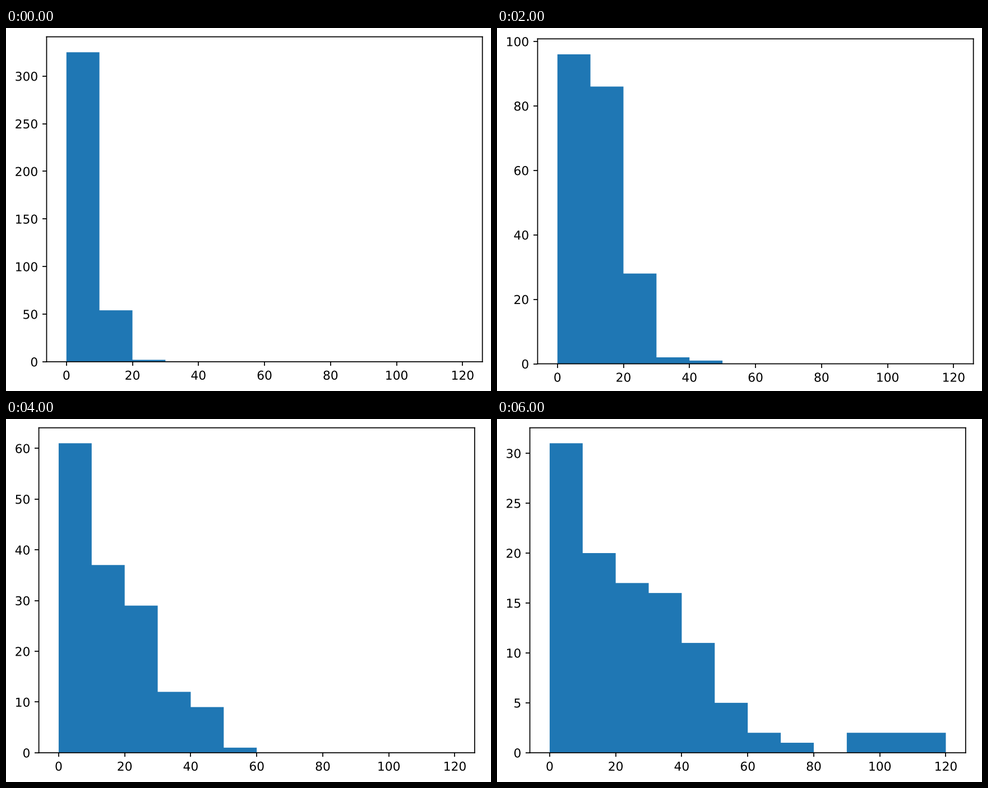
A matplotlib script that plays this animation: 865 px wide and 647 px high, repeating every 8000 ms.

```python
import matplotlib.pyplot as plt
import numpy as np
from matplotlib import patheffects
from matplotlib.animation import FuncAnimation

W, H, DPI = 865, 647, 128
PX = 156.7                        # pixels per inch of the chart itself
SCALE = PX / DPI                  # enlarges the default text and line sizes
AX_W, AX_H = 4.96 * PX, 3.696 * PX
PAD = 0.1 * PX
DIGIT = 0.636 * 10 * PX / 72      # advance of one digit at 10 pt
LABEL_HALF = 0.38 * 10 * PX / 72  # tick position to label top
TICK_GAP = 7 * PX / 72            # tick length plus label padding
BIN, BINS = 10, 12
STEP, LENGTH = 500, 8000

# Key histograms by step; the bars shrink geometrically in between.
KEYS = {
    0: [325, 54, 2],
    2: [191, 100, 8],
    4: [96, 86, 28, 2, 1],
    5: [87, 83, 25, 6, 0, 1],
    8: [61, 37, 29, 12, 9, 1],
    10: [45, 30, 24, 13, 8, 5, 2, 1],
    12: [31, 20, 17, 16, 11, 5, 2, 1, 0, 2, 2, 2],
}
STEPS = list(KEYS)
LOGS = np.log1p([c + [0] * (BINS - len(c)) for c in KEYS.values()])

plt.rcParams.update({
    "font.family": "DejaVu Sans",
    "font.size": 10 * SCALE,
    "axes.linewidth": 0.8 * SCALE,
    "path.snap": False,
    "text.hinting": "none",
    "toolbar": "None",
    # Draws text and ticks as paths, at fractions of a pixel.
    "path.effects": [patheffects.Normal()],
})
for axis in ("xtick", "ytick"):
    plt.rcParams.update({
        f"{axis}.major.size": 3.5 * SCALE,
        f"{axis}.major.pad": 3.5 * SCALE,
        f"{axis}.major.width": 0.8 * SCALE,
    })

fig = plt.figure(figsize=(W / DPI, H / DPI), dpi=DPI, facecolor="white")
ax = fig.add_axes([0, 0, AX_W / W, AX_H / H])


def histogram(step):
    """Bar heights at a step, held after the last key."""
    counts = np.expm1([np.interp(step, STEPS, bar) for bar in LOGS.T])
    return np.ceil(counts.round(6))


def place_axes(limit):
    """Fit the axes to the top left, leaving room for the tick labels."""
    last = max(t for t in ax.get_yticks() if t <= limit)
    gap = (1 - last / limit) * AX_H
    top = PAD + max(0, LABEL_HALF - gap)
    left = PAD + len(f"{last:.0f}") * DIGIT + TICK_GAP
    ax.set_position([left / W, 1 - (top + AX_H) / H, AX_W / W, AX_H / H])


def draw(step):
    counts = histogram(step)
    limit = 1.05 * counts.max()
    ax.clear()
    ax.stairs(counts, BIN * np.arange(BINS + 1), fill=True,
              color="#1f77b4", lw=0)
    ax.set_xlim(-6, 126)
    ax.set_ylim(0, limit)
    ax.set_xticks(range(0, 121, 20))
    place_axes(limit)
    return []


anim = FuncAnimation(fig, draw, frames=LENGTH // STEP,
                     init_func=lambda: draw(0), interval=STEP,
                     repeat=True, repeat_delay=0)
plt.show()
```
